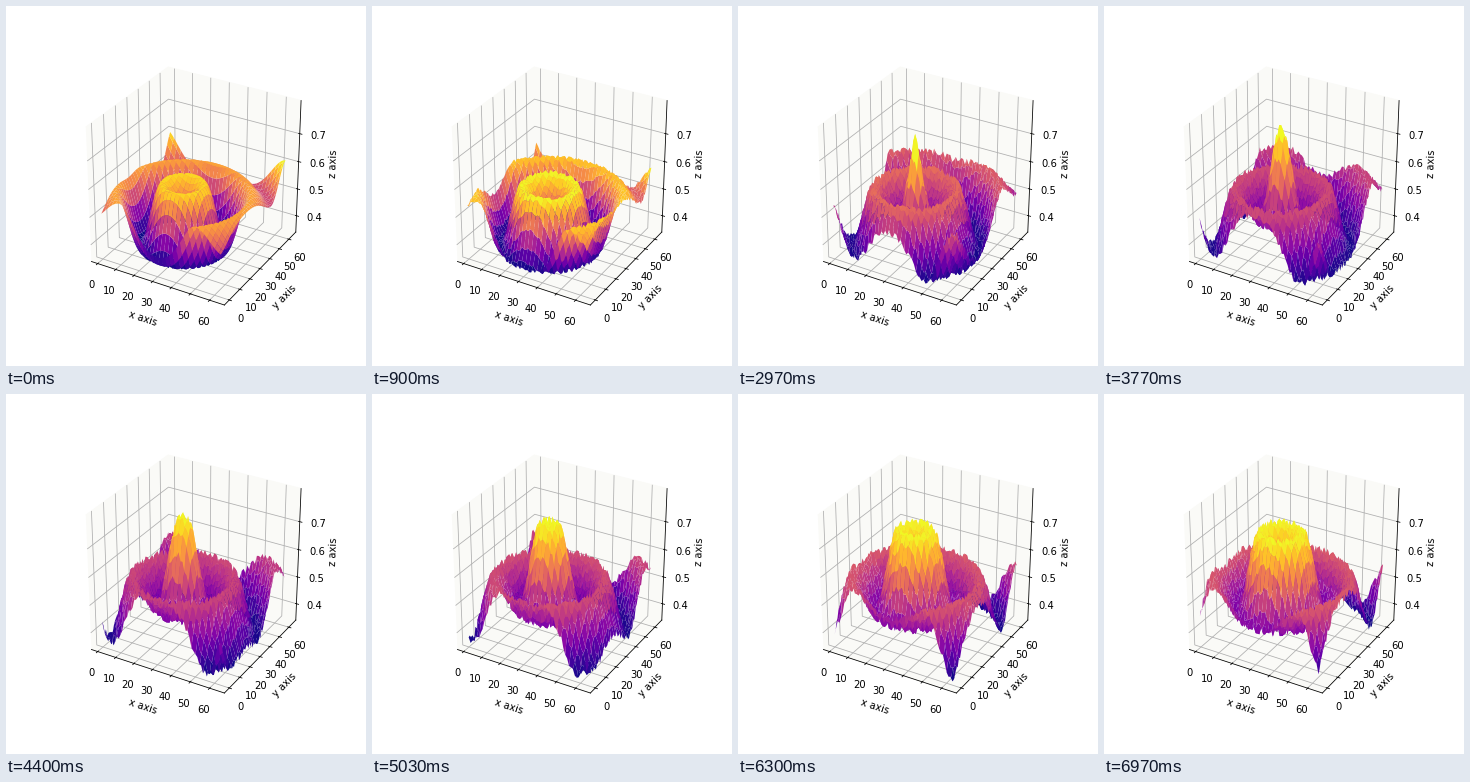
Animation, 360 px wide and 360 px high, one loop 7010 ms. Source, as a matplotlib script:

```python
import numpy as np
import matplotlib.pyplot as plt
from matplotlib.animation import FuncAnimation
from mpl_toolkits.mplot3d.art3d import Poly3DCollection

LOOP = 7010
FRAMES = 210
N = 64
CX, CY = 30, 24      # where the ripples start
SPEED = 3.15         # grid cells per second

# Crests and troughs of the outgoing wave along u = r - SPEED * t
KNOTS = [-24, -11.5, -1, 10.3, 21, 31, 41.5, 51, 62]
LEVELS = np.array([.55, .71, .45, .57, .363, .56, .49, .61, .55])

rng = np.random.default_rng(4)
phase = rng.uniform(0, 2 * np.pi, (N, N))
rate = rng.uniform(1, 4, (N, N))

gx, gy = np.meshgrid(np.arange(N), np.arange(N))
radius = np.hypot(gx - CX, gy - CY)

# Outline of every 2 x 2 patch, clipped at the far edges
ci, cj = (a.reshape(-1, 1) for a in np.mgrid[0:N:2, 0:N:2])
rows = np.minimum(ci + [0, 0, 0, 1, 2, 2, 2, 1], N - 1)
cols = np.minimum(cj + [0, 1, 2, 2, 2, 1, 0, 0], N - 1)


def wave(u):
    k = np.interp(u, KNOTS, np.arange(len(KNOTS)))
    i = np.minimum(k.astype(int), len(KNOTS) - 2)
    f = k - i
    f = f * f * (3 - 2 * f)
    return LEVELS[i] * (1 - f) + LEVELS[i + 1] * f


def height(t):
    rough = .013 * (1 - np.exp(-t / 1.5)) * np.sin(phase + rate * t)
    return wave(radius - SPEED * t) + .09 * np.exp(-radius / 7) + rough


def patches(t):
    z = height(t)[rows, cols]
    return np.stack([cols, rows, z], axis=-1), z.mean(axis=1)


fig = plt.figure(figsize=(5, 5), dpi=72, facecolor="white")
ax = fig.add_axes([.137, .123, .757, .757], projection="3d")
ax.set_box_aspect((1, 1, 1), zoom=.9468)
ax.view_init(elev=30, azim=-60)
ax.set(xlim=(-3.5, 67.6), ylim=(-4.6, 67.6), zlim=(.338, .816),
       xticks=range(0, 61, 10), yticks=range(0, 61, 10),
       zticks=[.4, .5, .6, .7],
       xlabel="x axis", ylabel="y axis", zlabel="z axis")
ax.tick_params(axis="z", pad=5)
for axis in (ax.xaxis, ax.yaxis, ax.zaxis):
    axis.set_pane_color((.98, .98, .97, 1))

verts, shade = patches(0)
surf = Poly3DCollection(verts, cmap="plasma", linewidth=0, antialiased=True)
surf.set_array(shade)
ax.add_collection3d(surf)


def update(n):
    verts, shade = patches(n * LOOP / FRAMES / 1000)
    surf.set_verts(verts)
    surf.set_array(shade)
    surf.set_clim(shade.min(), shade.max())
    return surf,


anim = FuncAnimation(fig, update, frames=FRAMES, interval=LOOP / FRAMES,
                     init_func=lambda: update(0), repeat=True,
                     repeat_delay=0, blit=False)
plt.show()
```
